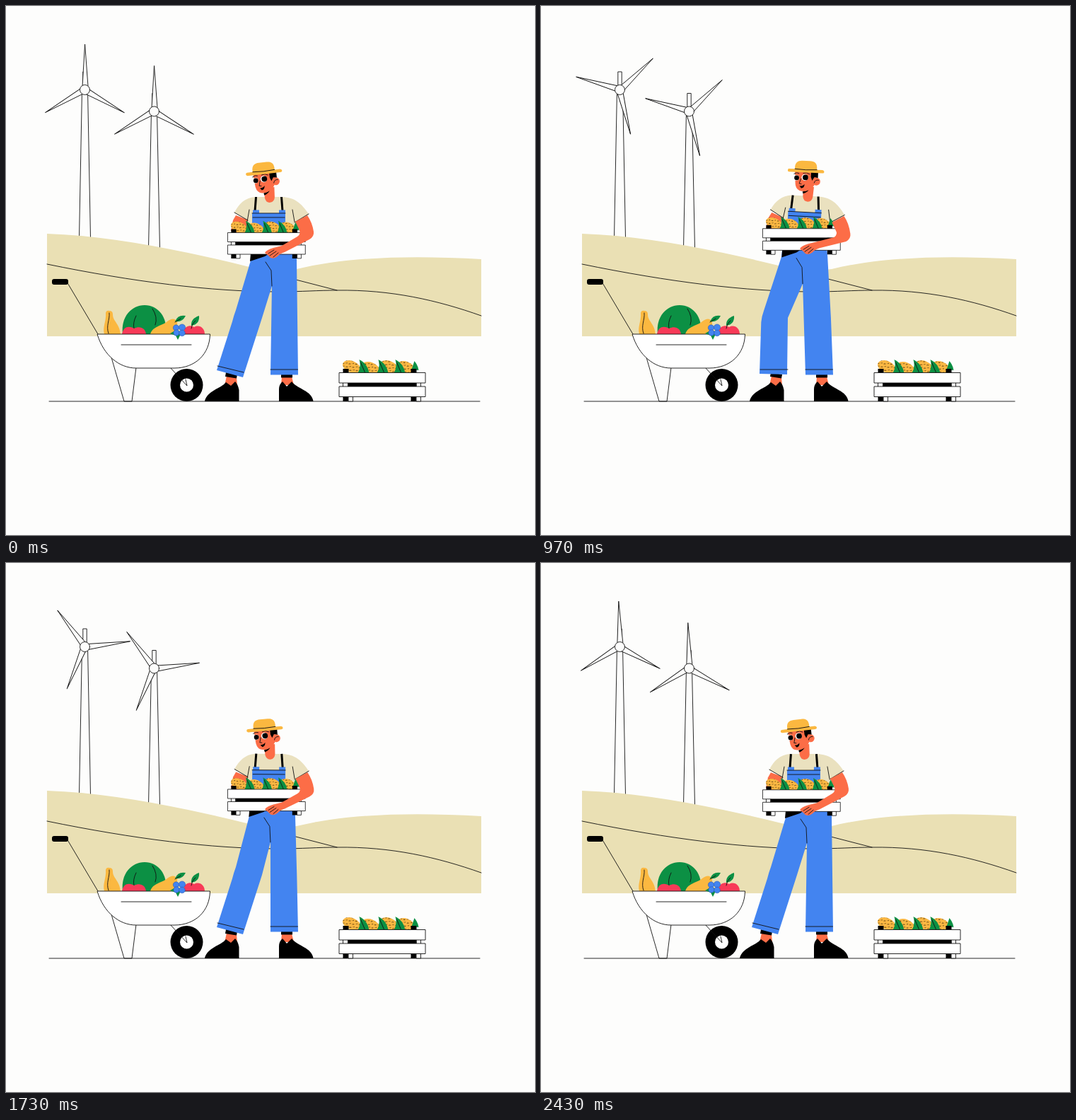
An HTML page for the animation above (2.46 s loop, 748 by 748 pixels).

```html
<!DOCTYPE html>
<html lang="en">
<head>
<meta charset="utf-8">
<title>Harvest</title>
<style>
html, body { margin: 0; width: 100%; height: 100%; overflow: hidden; background: #fdfdfc; }
svg { display: block; width: 100vw; height: 100vh; }
.ln { fill: none; stroke: #111; stroke-width: .9; stroke-linecap: round; stroke-linejoin: round; }
.box { fill: #fff; stroke: #111; stroke-width: .9; stroke-linejoin: round; }
.ln.paper { fill: #fdfdfc; }
.sand { fill: #eae0b4; }
.shirt { fill: #eae1bf; }
.blue { fill: #4384f0; }
.skin { fill: #fc6d47; }
.yellow { fill: #fbb840; }
.green { fill: #0c9044; }
.red { fill: #f83a58; }
</style>
</head>
<body>
<svg viewBox="0 0 748 748">
  <defs>
    <pattern id="grain" width="7" height="6" patternUnits="userSpaceOnUse" patternTransform="rotate(22)">
      <rect width="7" height="6" fill="#fbb843"/>
      <path d="M1 3.600L3.200 1.800M4.600 5.400L6 4.300" stroke="#2a1a00" stroke-width="1"/>
    </pattern>
    <path id="blade" class="ln paper" d="M-3.500 -5L0 -64.500L4.500 -5Z"/>
    <g id="crate">
      <g id="corn"></g>
      <path d="M6 -5h8v46h-8zM102 -5h8v46h-8z"/>
      <path class="box" d="M13.500 34h6.500v7h-6.500zM109.500 34h6.500v7h-6.500z"/>
      <path class="box" d="M6 14h7v7h-7zM109.500 14h6.500v7h-6.500z"/>
      <path d="M13 15h97v5h-97z"/>
      <path class="box" d="M.5 .5h122v14.500h-122zM.5 20h122v14.500h-122z"/>
    </g>
  </defs>

  <g id="mills"></g>

  <path class="sand" d="M58 322C150 325 250 346 340 368Q378 377 411 372C480 355 570 352 672 358V467H58Z"/>
  <path class="ln" d="M58 365C180 390 290 404 385 404C420 404 440 402 468 402C545 401 610 416 672 438M375 378L468 402"/>
  <path class="ln" d="M61 559H670"/>

  <!-- wheelbarrow -->
  <path class="ln" d="M86 390L130 464M147 490L167 559H178L184 511"/>
  <rect x="65" y="386" width="23" height="8" rx="3"/>
  <circle cx="255.500" cy="536" r="23"/>
  <circle cx="255.500" cy="536" r="9.500" fill="#fff"/>
  <path class="ln" d="M232 511L256 537L254 528"/>
  <path class="yellow" d="M141 434Q142 430 146 431Q151 431 151 436C151 446 160 448 162 464H139C136 454 142 446 141 434Z"/>
  <path class="ln" d="M146 434C147 444 141 452 145 463"/>
  <path class="green" d="M165 464C162 440 177 423 196 423S229 440 226 464Z"/>
  <path class="ln" d="M184 438Q179 448 181 456M207 428Q215 440 211 451"/>
  <path class="yellow" d="M204 464C208 452 220 453 228 446Q237 439 242 446Q243 452 238 464Z"/>
  <path class="red" d="M164 464C166 453 174 452 181 456C189 452 197 455 198 464Z"/>
  <path class="green" d="M239 446Q243 436 254 438Q249 448 239 446Z"/>
  <path class="red" d="M251 464C251 453 259 450 266 454C273 450 281 455 281 464Z"/>
  <path class="green" d="M262 452Q261 442 273 438Q274 450 262 452Z"/>
  <path class="ln" d="M262 456Q263 449 268 445M239 447L247 442"/>
  <path class="box" d="M129 464H288.500C288 492 268 512 238 512H184C160 512 138 494 129 464Z"/>
  <path class="ln" d="M163 479H262"/>
  <path class="green" d="M232 463L241 458L254 464L246 466L243 472L240 466Z"/>
  <g class="blue" stroke="#1f4fa8" stroke-width=".5"><circle cx="240.500" cy="455" r="4.200"/><circle cx="249" cy="454.500" r="4.600"/><circle cx="241" cy="462" r="4.200"/><circle cx="249" cy="462.500" r="4.300"/></g>

  <use href="#crate" x="470.500" y="518"/>

  <!-- farmer -->
  <path class="skin" d="M390 524H404L407 536H389Z"/>
  <path d="M389 520H405V525.500H389Z"/>
  <path d="M386 559V542Q386 535 391 531L397 538L404 531C411 541 433 544 434.500 559Z"/>
  <g id="foot">
    <path class="skin" d="M312 523L326 525L327 537H309Z"/>
    <path d="M311 518L327 521L326 526.500L310 524Z"/>
    <path d="M329.500 559V543Q328 535 324 531L318 537L311 532C304 541 284 544 281 559Z"/>
  </g>
  <path class="blue" id="rightLeg"/>
  <path class="blue" id="leftLeg"/>
  <path class="ln" id="seams"/>
  <path id="shade" d="M346 350H372L366 354L345 361Z"/>

  <g id="torso">
    <path class="skin" d="M325 296L341 302L340 325L318 318L321 303Z"/>
    <path class="shirt" d="M352 270H391C408 271 417 278 428 294L408 307V325H341V302L323 292C329 280 338 271 352 270Z"/>
    <path class="ln" d="M323 292L342 303M344 288L341 305M428 294L408 306M405 288L408 305"/>
    <path d="M353.500 270L352 290M389.500 270L391 290" stroke="#000" stroke-width="3"/>
    <path class="blue" d="M348 293H395V326H348ZM349 288.500H358V293H349ZM386 288.500H395V293H386Z"/>
    <path class="ln" d="M348 293H395M349 299H394"/>
  </g>

  <g id="head">
    <path class="skin" d="M369 256H384L383 270Q382 277 376 277Q370 277 369 270Z"/>
    <path d="M368 263Q373 263 377 260Q375 264 369 266Z"/>
    <path class="skin" d="M356 234H386V246C386 256 377 263 367 262.500Q359 262 357.500 253Z"/>
    <circle class="skin" cx="387" cy="248" r="5.500"/>
    <path d="M379 234H389V243L384 242L381 247L379 242Z"/>
    <path class="ln" d="M384 250Q385 245 390 246M365 245L363 252L366 252.500M355 238.500Q359 235.500 362 237.500M368 237Q373 235 377 238"/>
    <g fill="#fff"><circle cx="358.500" cy="244" r="3.800"/><circle cx="370.500" cy="243" r="4.600"/></g>
    <circle cx="359" cy="244" r="3.400"/><circle cx="371.300" cy="243" r="3.900"/>
    <path d="M363.500 255Q368 256 370.500 252.500Q370.500 258 366 258.500Z"/>
    <path class="yellow" d="M356 231.500C355 222 360 219.500 366 219.500H377C383 219.500 388 222 387 231.500H395Q397.500 232 397.500 234Q397.500 236 395 236H348Q345.500 235.500 346 233.500Q346 231.500 348 231.500Z"/>
    <path class="ln" d="M356 231.500Q371 233 387 231.500"/>
  </g>

  <g id="held"><use href="#crate" transform="translate(313 320) scale(.9)"/></g>
  <path class="skin" id="arm"/>
  <path class="ln" id="fingers" d="M371 350L379 345M373 353L382 347M378 355L385 349"/>
</svg>
<script>
const LOOP = 2460;
const $ = id => document.getElementById(id);
const set = (id, name, value) => $(id).setAttribute(name, value);

$('corn').innerHTML =
  [[18, -8], [45, -6], [71, -8], [95, -7]].map(([x, y]) =>
    `<ellipse cx="${x}" cy="${y}" rx="13" ry="8.200" fill="url(#grain)" transform="rotate(22 ${x} ${y})"/>`).join('') +
  [29, 56, 80].map(x =>
    `<path class="green" d="M${x} -18Q${x + 12} -12 ${x + 14} 1H${x - 2}Q${x + 3} -8 ${x} -18Z"/>
     <path class="ln" d="M${x + 2} -14L${x + 8} 0" stroke-width=".6"/>`).join('') +
  '<path class="green" d="M107 -16Q112 -10 113 -3L103 -4Z"/>';

$('mills').innerHTML = [[111.5, 118.5, 328], [209.5, 149, 343]].map(([x, y, foot]) => `
  <path class="ln" d="M${x - 4} ${y}L${x - 8} ${foot}M${x + 4} ${y}L${x + 8} ${foot}M${x - 2.7} ${y}v-25.500h5.400v25.500"/>
  <g transform="translate(${x} ${y})">
    <g class="rotor">${[0, 120, 240].map(a => `<use href="#blade" transform="rotate(${a})"/>`).join('')}</g>
    <circle class="ln paper" r="7"/>
  </g>`).join('');
const rotors = document.querySelectorAll('.rotor');

// time, upper body lean, hip shift, crate height
const KEYS = [
  [0, .13, 0, 0], [330, .6, .65, -5], [570, 1, 1, -9.5], [660, 1.01, 1, -9.4],
  [970, .73, .85, -5.7], [1470, .47, .65, -2.3], [1970, 0, 0, .7], [2430, .11, 0, .3]
];

function key(i) {
  const n = KEYS.length, wrap = Math.floor(i / n), k = KEYS[i - wrap * n];
  return [k[0] + wrap * LOOP, ...k.slice(1)];
}

function sample(t, col) {
  let i = KEYS.length - 1;
  while (KEYS[i][0] > t) i--;
  const [a, b, c, d] = [i - 1, i, i + 1, i + 2].map(key);
  const span = c[0] - b[0], u = (t - b[0]) / span;
  const m0 = (c[col] - a[col]) / (c[0] - a[0]) * span;
  const m1 = (d[col] - b[col]) / (d[0] - b[0]) * span;
  const u2 = u * u, u3 = u2 * u;
  return (2 * u3 - 3 * u2 + 1) * b[col] + (u3 - 2 * u2 + u) * m0 +
         (3 * u2 - 2 * u3) * c[col] + (u3 - u2) * m1;
}

function smooth(from, to, t) {
  const u = Math.min(1, Math.max(0, (t - from) / (to - from)));
  return u * u * (3 - 2 * u);
}

// outer knee, inner knee, outer cuff, inner cuff: apart, lifted, together
const LEG = [
  [322, 438, 362, 441, 298, 515, 335, 525],
  [306, 436, 344, 440, 303, 516, 342, 518],
  [312, 439, 349, 441, 309, 520, 348, 521]
];

function legPose(s) {
  const i = s < .5 ? 0 : 1, u = s * 2 - i;
  return LEG[i].map((v, j) => v + (LEG[i + 1][j] - v) * u);
}

function draw(t) {
  const lean = sample(t, 1), hip = sample(t, 2), lift = sample(t, 3);
  const step = smooth(130, 530, t) - smooth(1270, 1670, t);
  const hop = Math.sin(Math.PI * step);
  const hx = -7 * hip, hy = -6.5 * hip, d = lean - .13, h = lean - .55;

  const turn = t / LOOP;
  const angle = 120 * turn - 1.4 * Math.abs(Math.sin(2 * Math.PI * turn));
  rotors.forEach(r => r.setAttribute('transform', `rotate(${angle})`));
  set('torso', 'transform', `translate(0 ${-2.5 * d}) rotate(${5 * d} 372 320)`);
  set('head', 'transform', `translate(${6 * h} ${-2 * h}) rotate(${15 * h} 376 275)`);
  set('held', 'transform', `translate(0 ${lift})`);
  set('fingers', 'transform', `translate(0 ${lift})`);
  set('shade', 'transform', `translate(${hx * .8} ${hy})`);
  set('foot', 'transform', `translate(${14 * step} ${-2.5 * hop}) rotate(${3 * hop} 318 559)`);

  const [ox, oy, ix, iy, cx, cy, ex, ey] = legPose(step);
  const crotch = [376 + hx, 396 + hy * .6];
  set('leftLeg', 'd', `M${347 + hx} ${349 + hy}L${346 + hx} ${360 + hy}
    L${ox + 3} ${oy - 8}Q${ox} ${oy} ${ox - .5 + (cx - ox) * .06} ${oy + 8}L${cx} ${cy}L${ex} ${ey}
    L${ix} ${iy}L${crotch}L${390 + hx} ${349 + hy}Z`);
  set('rightLeg', 'd', `M${365 + hx} ${348 + hy}H${409 + hx}Q${411 + hx} ${352 + hy} ${411 + hx} ${358 + hy}
    L${412 - 2.5 * hip} 440L413 521.500H374L${crotch}Z`);
  set('seams', 'd', `M${367 + hx} ${362 + hy}L${375 + hx} ${374 + hy * .8}L${crotch}
    M374 514H412.500M${cx + 1} ${cy - 6}L${ex + 1} ${ey - 7}`);

  const sx = 4 * d, sy = 1.5 * d, kx = 4 * d, ky = 5 * d;
  set('arm', 'd', `M${409 + sx} ${305 + sy}L${426 + sx} ${296 + sy}
    Q${433 + kx} ${306 + sy} ${435 + kx} ${319 + ky}Q${436 + kx} ${326 + ky} ${429 + kx} ${330 + ky}
    L394 ${348 + lift}Q387 ${350 + lift} 384 ${354 + lift}Q379 ${358 + lift} 374 ${356 + lift}
    L370 ${352 + lift}L366 ${349 + lift}Q368 ${345 + lift} 378 ${342 + lift}L390 ${339 + lift}
    L${412 + kx} ${326 + ky * .3}Q${418 + kx} ${322 + ky * .4} ${414 + kx} ${315 + ky * .5}Z`);
}

function tick() {
  draw(performance.now() % LOOP);
  requestAnimationFrame(tick);
}
tick();
</script>
</body>
</html>
```
